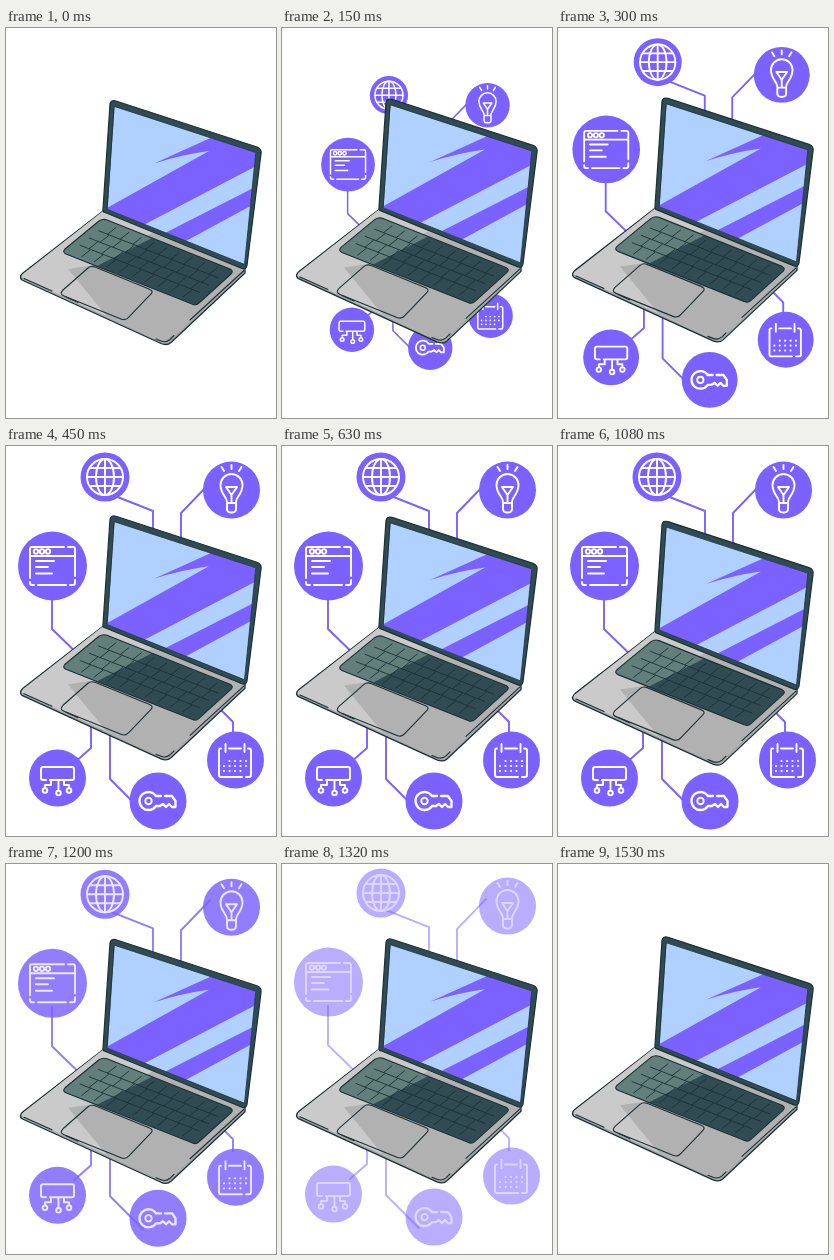
An HTML page that plays this animation: 270 px wide and 390 px high, repeating every 1560 ms.

```html
<!DOCTYPE html>
<html>
<head>
<meta charset="utf-8">
<style>
  html, body { margin: 0; width: 100%; height: 100%; overflow: hidden; background: #fff; }
  svg { display: block; width: 100%; height: 100%; }
  #network > * { opacity: var(--fade); }
  .link, .icon, .ink { fill: none; stroke-linecap: round; stroke-linejoin: round; }
  .link { stroke: #7b61ff; stroke-width: 1.9; }
  .icon { stroke: #fff; stroke-width: 1.9; }
  .ink { stroke: #1b3036; stroke-width: 1.1; }
  .disc { fill: #7b61ff; }
</style>
</head>
<body>
<svg viewBox="0 0 270 390">
  <g id="network">
    <path class="link" d="M104 48L147 65V100"/>
    <path class="link" d="M204 37L175 67V110"/>
    <path class="link" d="M46 144V183L80 216"/>
    <path class="link" d="M68 317L85 302V270"/>
    <path class="link" d="M104 280V333L137 366"/>
    <path class="link" d="M227 288V276L210 259"/>

    <circle class="disc" cx="99" cy="31" r="24.5"/>
    <g class="icon">
      <circle cx="99" cy="31" r="18"/>
      <ellipse cx="99" cy="31" rx="9" ry="18"/>
      <path d="M99 13V49M81 31H117M84 22H114M84 40H114"/>
    </g>

    <circle class="disc" cx="225.5" cy="44" r="28.5"/>
    <path class="icon" d="M221 56C221 51 214.500 48 214.500 39A11 11 0 1 1 236.500 39C236.500 48 230 51 230 56M221 57H230V63Q230 66.500 225.500 66.500T221 63ZM220 41H231L225.500 49ZM225.500 49V56M225.500 19V23M215.500 21L218 25M235.500 21L233 25"/>

    <circle class="disc" cx="46.5" cy="120" r="34.5"/>
    <g class="icon">
      <path d="M58 101H26Q24 101 24 103V132M24 136V137Q24 139 26 139H28M32 139H60M64 139H67Q69 139 69 137V134M69 130V103Q69 101 67 101H62M24 110H69M30 115H48M30 121H42M30 127.500H46"/>
      <circle cx="30" cy="105.5" r="2.2"/>
      <circle cx="36" cy="105.5" r="2.2"/>
      <circle cx="42" cy="105.5" r="2.2"/>
    </g>

    <circle class="disc" cx="51.5" cy="332" r="28.5"/>
    <g class="icon">
      <path d="M40 334H37Q35 334 35 332V323Q35 321 37 321H66Q68 321 68 323V332Q68 334 66 334H44M45 334V339H39V342M52.500 334V344M58 334V339H63V342"/>
      <circle cx="39" cy="344.5" r="2.3"/>
      <circle cx="52.5" cy="347" r="2.3"/>
      <circle cx="63" cy="344.5" r="2.3"/>
    </g>

    <circle class="disc" cx="152" cy="355" r="28.5"/>
    <g class="icon">
      <path stroke-width="2.3" d="M150 350A9 9 0 1 0 150 360H154L157 358L160 361L163 358L166 361H169.500V355L166 350H159M155 350H150"/>
      <circle cx="142.5" cy="355" r="3.2"/>
    </g>

    <circle class="disc" cx="229.5" cy="314" r="28.5"/>
    <g class="icon">
      <path d="M215 302.500H214.500Q213 302.500 213 304.500V329Q213 331 215 331H236M240 331H243Q245 331 245 329V304.500Q245 302.500 243 302.500H242M223 302.500H235M219.500 298V306M238.500 298V306"/>
      <path stroke-width="2.2" stroke-dasharray="0 5.5" d="M223.500 315H241M218 320H241M218 325H236"/>
    </g>
  </g>

  <g id="laptop">
    <path d="M97 183L17 245Q12.500 249 16 252L155 315.500Q161 318 165 314.500L239 245V240Z" fill="#a9a9a9" stroke="#1b3036" stroke-width="1.3" stroke-linejoin="round"/>
    <path d="M97 183L17 246Q14 249 18 250.500L155 313Q160 315 164 311.500L238.500 241Z" fill="#cacaca"/>
    <path d="M146 205L90 237L62 241L101 288.500L155 313Q160 315 164 311.500L238.500 241Z" fill="#b1b1b1"/>
    <path class="ink" stroke-width=".8" d="M18 250.500L46 263M60 269L72 274.500M150 311L155 313Q160 315 164 311.500L168 307.500M184 292L238 242.500"/>
    <path class="ink" d="M89 239L143 261Q148 263 145 266L123 289Q120 293 115 291L58 268Q53 266 57 262L82 240Q85 237.500 89 239Z"/>
    <path d="M101 192L224 241Q228 243 225 246L193 275Q190 278 186 276L60 226Q56 224 59 221L93 193Q97 190.500 101 192Z" fill="#304c52"/>
    <path d="M101 192L146 210L91 238L60 226Q56 224 59 221L93 193Q97 190.500 101 192Z" fill="#627f7c"/>
    <path id="keys" class="ink" style="stroke-width: .9"/>
    <path class="ink" d="M101 192L224 241Q228 243 225 246L193 275Q190 278 186 276L60 226Q56 224 59 221L93 193Q97 190.500 101 192Z"/>

    <path d="M104 76Q105 71.500 110 73L251 119Q256 121 255 126L241 237.500Q240 242 236 240.500L99 184.500Q96.500 184 97 181Z" fill="#304c52" stroke="#1b3036" stroke-width="1.2"/>
    <path d="M108.500 78.500L249.800 124.500L238.500 236.500L101.500 181.500Z" fill="#b0d0ff"/>
    <path d="M205 109.800L148 135.500Q176 126.500 203 123L101.800 179.500V181.600L138.500 196.400L248.300 139L249.800 124.500ZM246.300 160.500L159.500 204.800L180 213L244.500 178Z" fill="#7b61ff"/>
    <path class="ink" style="stroke-width: .8" d="M108.500 78.500L249.800 124.500L238.500 236.500L101.500 181.500Z"/>
  </g>
</svg>
<script>
const LOOP = 1560;
const network = document.getElementById('network');
const laptop = document.getElementById('laptop');
const clamp = x => Math.min(1, Math.max(0, x));

// Point on the keyboard: u runs along the hinge, v towards the user.
const keyPoint = (u, v) => `${98 + 127 * u - 37 * v} ${194 + 50 * u + 29 * v}`;
const keyLine = (u1, v1, u2, v2) => `M${keyPoint(u1, v1)}L${keyPoint(u2, v2)}`;
let grid = '';
for (let row = 1; row < 4; row++) grid += keyLine(0.03, row / 4, 0.97, row / 4);
for (let col = 1; col < 10; col++) {
  for (let row = 0; row < 4; row++) {
    const u = (col + (row % 2) * 0.15) / 10;
    grid += keyLine(u, row / 4 + 0.02, u, row / 4 + 0.25);
  }
}
document.getElementById('keys').setAttribute('d', grid);

function draw() {
  const t = performance.now() % LOOP;
  const bob = -2.8 * Math.sin(2 * Math.PI * t / LOOP);
  laptop.setAttribute('transform', `translate(0 ${bob})`);

  const scale = 1 - (1 - clamp(t / 480)) ** 4;
  const leave = clamp((t - 1130) / 395);
  network.setAttribute('transform',
    `translate(135 ${195 - 4 * leave}) scale(${scale}) translate(-135 -195)`);
  network.style.setProperty('--fade', 1 - leave);
  requestAnimationFrame(draw);
}
draw();
</script>
</body>
</html>
```
